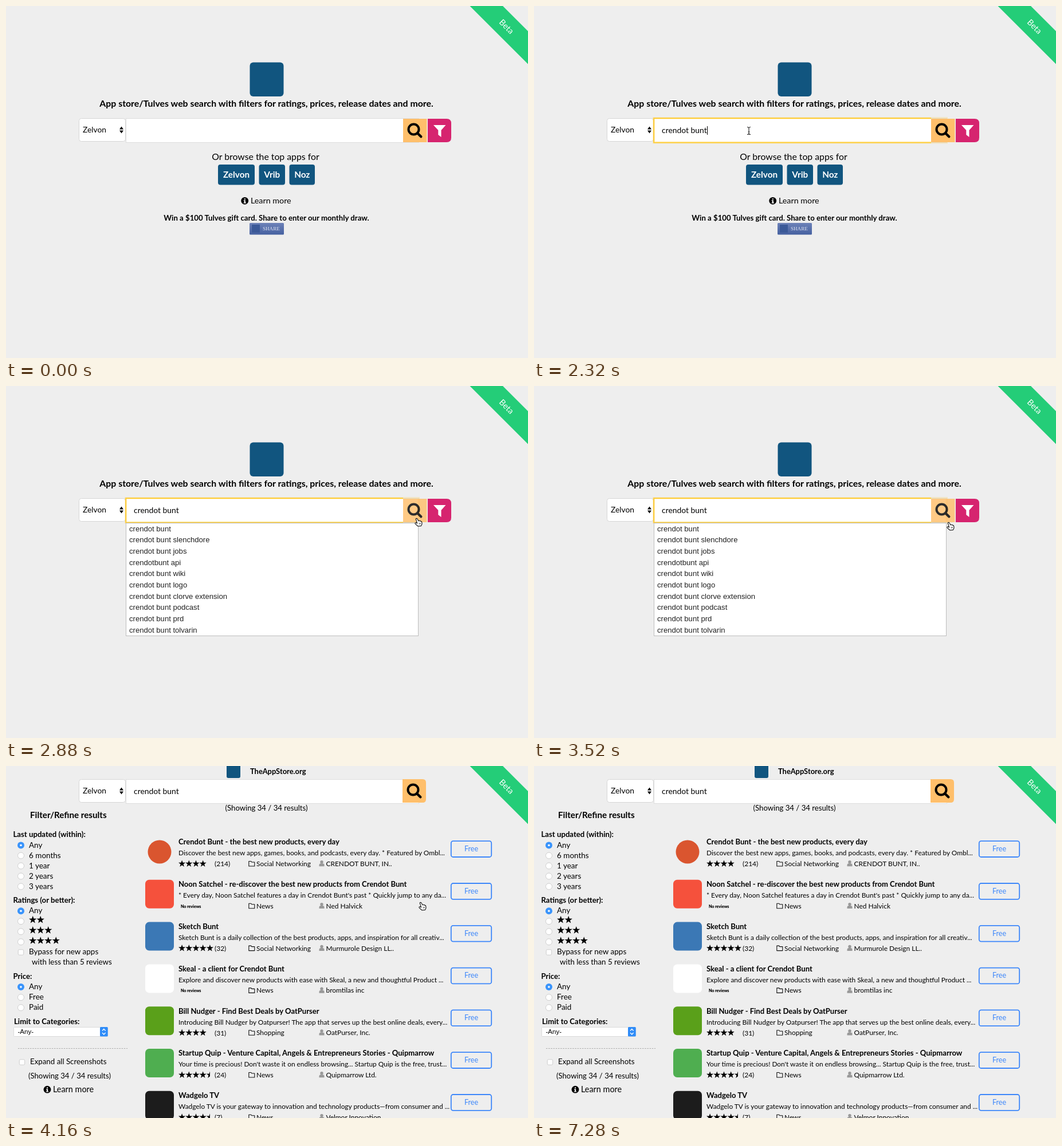
An HTML page that plays this animation: 911 px wide and 615 px high, repeating every 7360 ms.

```html
<!DOCTYPE html>
<html lang="en">
<head>
<meta charset="utf-8">
<title>App search</title>
<style>
  html, body { margin: 0; width: 100%; height: 100%; overflow: hidden; background: #eee; }
  svg { display: block; width: 911px; height: 615px; }
  text { font-family: Lato, "Open Sans", sans-serif; white-space: pre; }
  .arial { font-family: "Liberation Sans", Arial, sans-serif; }
  .serif { font-family: "Liberation Serif", serif; }
</style>
</head>
<body>
<svg id="stage" viewBox="0 0 911 615" xmlns="http://www.w3.org/2000/svg"></svg>
<script>
const LOOP = 7360, STEP = 80;
const BLUE = '#11557f', ORANGE = '#ffbf6b', LINK = '#3d87fa';
const QUERY = 'crendot bunt', DEVICE = 'Zelvon';

const text = (x, y, size, str, attrs = '') =>
  `<text x="${x}" y="${y}" font-size="${size}" ${attrs}>${str}</text>`;
const bold = (x, y, size, str, attrs = '') => text(x, y, size, str, 'font-weight="700" ' + attrs);
const rect = (x, y, w, h, fill, attrs = '') =>
  `<rect x="${x}" y="${y}" width="${w}" height="${h}" fill="${fill}" ${attrs}/>`;
const circle = (x, y, r, fill, attrs = '') => `<circle cx="${x}" cy="${y}" r="${r}" fill="${fill}" ${attrs}/>`;
const path = (d, fill, attrs = '') => `<path d="${d}" fill="${fill}" ${attrs}/>`;
const group = (id, ...parts) => `<g id="${id}">${parts.join('')}</g>`;
const MID = 'text-anchor="middle"';

// Points of a star; a half star keeps only the points left of its axis.
function star(x, y, r, half) {
  const points = [];
  for (let i = 0; i <= (half ? 5 : 9); i++) {
    const a = -Math.PI / 2 - i * Math.PI / 5, d = i % 2 ? r * 0.4 : r;
    points.push(`${(x + d * Math.cos(a)).toFixed(2)},${(y + d * Math.sin(a)).toFixed(2)}`);
  }
  return `<polygon points="${points.join(' ')}"/>`;
}
function stars(x, y, count, r, pitch) {
  let out = '';
  for (let i = 0; i < count; i++) out += star(x + pitch * (i + 0.5), y, r, count - i < 1);
  return out;
}

const magnifier = (x, y) =>
  circle(x - 2, y - 2, 9, 'none', 'stroke="#000" stroke-width="4"') +
  path(`M${x + 4.7} ${y + 4.7}L${x + 10.8} ${y + 10.8}`, 'none', 'stroke="#000" stroke-width="4.4" stroke-linecap="round"');
const info = (x, y) => circle(x, y, 6.4, '#000') +
  path(`M${x - 1} ${y - 4}h2.2v2h-2.2zM${x - 2} ${y - 1}h3.2v4h1v1.4h-4.2v-1.4h1v-2.6h-1z`, '#eee');
const radio = (y, on) => on
  ? circle(26, y, 6, '#3a94fb') + circle(26, y, 1.8, '#fff')
  : circle(26, y, 5.5, '#fff', 'stroke="#c4c4c4" stroke-width=".8"');
const checkbox = (x, y) => rect(x - 4.7, y - 4.7, 9.4, 9.4, '#fff', 'rx="2" stroke="#c4c4c4" stroke-width=".8"');
const deviceSelect = y =>
  rect(127.5, y + 0.5, 81, 40, '#fff', 'rx="4" stroke="#d6d6d6"') +
  text(134, y + 25.3, 13.8, DEVICE) +
  path(`M198 ${y + 19.5}l3.5 -5l3.5 5zM198 ${y + 21.5}l3.5 5l3.5 -5z`, '#000');
const inputBox = y => rect(209.5, y + 0.5, 511, 42, '#fff', 'stroke="#ddd"');
const ribbon = path('M809.5 0H867L911 44V101.5Z', '#24cd78') +
  text(0, 5, 14.3, 'Beta', `${MID} fill="#fff" transform="translate(873.5 36) rotate(45)"`);

const pill = (x, w, label) => rect(x, 277, w, 35.5, BLUE, 'rx="4"') +
  bold(x + w / 2, 300.3, 15.3, label, `${MID} fill="#fff"`);

const suggestions = [QUERY, QUERY + ' slenchdore', QUERY + ' jobs', 'crendotbunt api', QUERY + ' wiki',
  QUERY + ' logo', QUERY + ' clorve extension', QUERY + ' podcast', QUERY + ' prd', QUERY + ' tolvarin'];

const home = group('home',
  ribbon,
  rect(425.5, 98.5, 59, 59.5, BLUE, 'rx="6"'),
  bold(454.5, 176.3, 15.85, 'App store/Tulves web search with filters for ratings, prices, release dates and more.', MID),
  text(453, 269.2, 15.8, 'Or browse the top apps for', MID),
  pill(370, 64, DEVICE), pill(441.5, 45.5, 'Vrib'), pill(494.5, 44.5, 'Noz'),
  info(416.7, 340.3), text(427, 345.2, 14.3, 'Learn more'),
  bold(454.5, 375, 13.2, 'Win a $100 Tulves gift card. Share to enter our monthly draw.', MID),
  rect(425, 379, 60, 20.5, 'url(#share)', 'rx="1.5"'),
  rect(429, 382, 14, 14, '#3b5998'),
  text(448, 392.3, 9.1, 'SHARE', 'class="serif" fill="#e4e8f4"'),
  deviceSelect(196), inputBox(196),
  group('focus',
    rect(209, 196, 511, 42.5, 'none', 'stroke="#ffc52e" stroke-opacity=".22" stroke-width="4"'),
    path('M693 196.2H209.2V238.6H693', 'none', 'stroke="#ffcb2b" stroke-width="1.8"')),
  group('dropdown',
    rect(209.5, 239.5, 510, 197, '#fff', 'stroke="#bdbdbd"'),
    ...suggestions.map((s, i) => text(215, 253.6 + i * 19.67, 13.1, s, 'class="arial" fill="#222"'))),
  group('go', rect(693, 197, 41.5, 41, ORANGE), magnifier(713.5, 217.5)),
  path('M736 197H769q8 0 8 8V230q0 8 -8 8H736Z', '#d6246f'),
  path('M746 208H767.5L759.5 217V229L754.3 225V217Z', '#fff'),
  text(223, 222, 13.9, '', 'id="typed"'),
  rect(302, 210, 1, 15, '#000', 'id="caret"'));

const controls = group('controls',
  rect(0, -6, 24, 27, BLUE, 'rx="3" id="mark"'),
  deviceSelect(23), inputBox(23),
  path('M692 23H727q6 0 6 6V58q0 6 -6 6H692Z', ORANGE),
  ...[138.5, 156.5, 174.5, 192.5, 210.5].map((y, i) => radio(y, !i)),
  ...[253.3, 271.3, 289.3, 307.3].map((y, i) => radio(y, !i)),
  checkbox(26, 325.5),
  ...[386, 404.2, 422.2].map((y, i) => radio(y, !i)),
  stars(40, 268.8, 2, 7, 13.5), stars(40, 287, 3, 7, 13.5),
  rect(13.5, 456.5, 164, 16, '#fff', 'rx="1" stroke="#d4d4d4" stroke-width=".8"'),
  rect(164, 456, 13.7, 16.5, '#2f8cf8', 'rx="1.5"'),
  path('M168 462.5l2.8 -3l2.8 3M168 466l2.8 3l2.8 -3', 'none', 'stroke="#fff" stroke-width="1.3"'),
  text(20.5, 468.3, 11.6, '-Any-', 'class="arial"'),
  path('M21 493.5H212', 'none', 'stroke="#aaa" stroke-dasharray="2.5 1.7"'),
  checkbox(28, 517.5));

const frame = (y, h) => rect(776.8, y, 70.4, h, 'none', `rx="3.5" stroke="${LINK}" stroke-width="1.8"`);
const loading = group('loading', ...Array.from({ length: 7 }, (_, i) => frame(131.2 + i * 71.4, 27)));

const apps = [
  ['#da552f', 'Crendot Bunt - the best new products, every day',
    'Discover the best new apps, games, books, and podcasts, every day. * Featured by Ombl...',
    4, 214, 'Social Networking', 'CRENDOT BUNT, IN..'],
  ['#f5513c', 'Noon Satchel - re-discover the best new products from Crendot Bunt',
    "* Every day, Noon Satchel features a day in Crendot Bunt's past * Quickly jump to any da...",
    0, 0, 'News', 'Ned Halvick'],
  ['#3b78b5', 'Sketch Bunt',
    'Sketch Bunt is a daily collection of the best products, apps, and inspiration for all creativ...',
    5, 32, 'Social Networking', 'Murmurole Design LL..'],
  ['#fff', 'Skeal - a client for Crendot Bunt',
    'Explore and discover new products with ease with Skeal, a new and thoughtful Product ...',
    0, 0, 'News', 'bromtilas inc'],
  ['#5aa01a', 'Bill Nudger - Find Best Deals by OatPurser',
    'Introducing Bill Nudger by Oatpurser! The app that serves up the best online deals, every...',
    4, 31, 'Shopping', 'OatPurser, Inc.'],
  ['#4fae50', 'Startup Quip - Venture Capital, Angels &amp; Entrepreneurs Stories - Quipmarrow',
    "Your time is precious! Don't waste it on endless browsing... Startup Quip is the free, trust...",
    4.5, 24, 'News', 'Quipmarrow Ltd.'],
  ['#1c1c1c', 'Wadgelo TV',
    'Wadgelo TV is your gateway to innovation and technology products—from consumer and ...',
    4.5, 7, 'News', 'Velmor Innovation']
];

function appRow([color, title, blurb, rating, reviews, category, maker], i) {
  const y = 125 + i * 73.8;
  return (i ? rect(243, y, 50, 50, color, 'rx="7"') : circle(268, y + 25, 20.5, color)) +
    bold(301, y + 12.4, 13.05, title) +
    text(301, y + 31.4, 11.9, blurb) +
    (rating ? stars(301, y + 45.8, rating, 6.4, 12.2) + text(364, y + 50.3, 12, `(${reviews})`)
            : text(305, y + 48.8, 7, 'No reviews', 'font-weight="900"')) +
    path(`M423.8 ${y + 50}v-8.5h4l1 1.5h5v7z`, 'none', 'stroke="#111" stroke-width="1.1" stroke-linejoin="round"') +
    text(437, y + 50, 11.9, category) +
    circle(551, y + 42.8, 2.7, '#999') +
    path(`M546.5 ${y + 50.3}v-2q0 -3 3 -3h3q3 0 3 3v2z`, '#999') +
    text(558.5, y + 50, 11.95, maker) +
    frame(y + 6.2, 27.8) + text(812, y + 24, 12.6, 'Free', `${MID} fill="${LINK}"`);
}

const label = (y, str) => text(40, y, 13.5, str);
const heading = (x, y, str) => bold(x, y, 13.2, str);
const results = group('results',
  ribbon,
  bold(426, 13.6, 12.9, 'TheAppStore.org'),
  text(223, 49, 13.9, QUERY), magnifier(712.5, 43.5),
  text(454.5, 78.2, 13.15, '(Showing 34 / 34 results)', MID),
  bold(42, 91, 15.2, 'Filter/Refine results'),
  heading(12.5, 123.8, 'Last updated (within):'),
  ...['Any', '6 months', '1 year', '2 years', '3 years'].map((s, i) => label(142.5 + i * 18, s)),
  heading(12.5, 239, 'Ratings (or better):'), label(257.3, 'Any'),
  stars(40, 305.2, 4, 7, 13.5),
  label(329.3, 'Bypass for new apps'), text(45, 347.2, 13.3, 'with less than 5 reviews'),
  heading(12.5, 371.8, 'Price:'),
  ...['Any', 'Free', 'Paid'].map((s, i) => label(390 + i * 18, s)),
  heading(14, 450.6, 'Limit to Categories:'),
  text(42, 521.4, 13.3, 'Expand all Screenshots'),
  text(39, 545.7, 13.15, '(Showing 34 / 34 results)'),
  info(72, 565.2), text(82, 570.3, 14.4, 'Learn more'),
  ...apps.map(appRow));

const pointers = group('pointer',
  group('arrow', path('M0 0V14L3.2 11L5.5 16L7.8 15L5.5 10.2H10Z', '#000', 'stroke="#fff"')),
  group('beam', path('M-3 -6.5Q0 -6.5 0 -4.5Q0 -6.5 3 -6.5M0 -5V5M-3 6.5Q0 6.5 0 4.5Q0 6.5 3 6.5M-1.5 2H1.5',
    'none', 'stroke="#222" stroke-width="1.1"')),
  group('hand', path('M-4.8 -5.8Q-3.2 -7.6 -1.8 -5.5L-.2 -2.3Q1 -3.2 2 -2.2Q3.2 -2.8 4 -1.6Q5.6 -1.6 5.8 .4L6 3L4.6 6.4L-1 7L-5.8 2.8Q-6.6 .8 -4.6 .8L-2.4 2Z',
    '#fff', 'stroke="#111" stroke-width="1.1" stroke-linejoin="round"') +
    path('M1 1.2l.6 2.6M3 .8l.5 2.6', 'none', 'stroke="#111" stroke-width=".8"')));

const stage = document.getElementById('stage');
stage.innerHTML = `<defs><linearGradient id="share" x2="0" y2="1"><stop stop-color="#6d82b8"/>
  <stop offset="1" stop-color="#4560a0"/></linearGradient></defs>` +
  rect(0, 0, 911, 615, '#eee') + home + controls + loading + results + pointers;

const el = {};
stage.querySelectorAll('[id]').forEach(node => el[node.id] = node);

// Each step: start time, then the state held until the next one.
const pointerSteps = [
  [0], [720, 470, 481, 'arrow'], [800, 452, 437, 'arrow'], [880, 425, 372, 'arrow'],
  [960, 396, 306, 'arrow'], [1040, 372, 252, 'arrow'], [1120, 362, 228, 'beam'], [1200, 375, 218, 'beam'],
  [2400, 436, 221, 'beam'], [2480, 545, 225, 'beam'], [2560, 626, 227, 'beam'], [2640, 676, 229, 'beam'],
  [2720, 702, 232, 'hand'], [2800, 714, 235, 'hand'], [2880, 720, 238, 'hand'], [2960, 723, 241, 'hand'],
  [3040, 725, 243, 'hand'], [3120, 726, 244, 'hand'], [3200, 727, 245, 'hand'],
  [4880, 716, 320, 'arrow'], [4960, 690, 480, 'arrow'], [5040]
];
const typingSteps = [[0, 0], [1840, 1], [1920, 3], [2000, 5], [2080, 7], [2160, 8], [2240, 10], [2320, 12]];
const caretSteps = [[0, false], [1760, true], [2560, false], [3040, true], [3520, false]];

const at = (steps, t) => steps.findLast(step => step[0] <= t);
const show = (node, on) => { node.style.display = on ? '' : 'none'; };

function render(t) {
  show(el.home, t < 4000);
  show(el.controls, t >= 4000);
  show(el.loading, t >= 4000 && t < 4160);
  show(el.results, t >= 4160);
  el.mark.setAttribute('x', t < 4160 ? 381 : 385);

  show(el.focus, t >= 1760);
  show(el.dropdown, t >= 2400);
  el.go.setAttribute('opacity', t >= 2720 ? 0.82 : 1);

  const typed = QUERY.slice(0, at(typingSteps, t)[1]);
  if (el.typed.textContent !== typed) el.typed.textContent = typed;
  show(el.caret, at(caretSteps, t)[1]);
  if (t < 4000) el.caret.setAttribute('x', Math.round(223 + (typed ? el.typed.getComputedTextLength() : 0)));

  const [, x, y, kind] = at(pointerSteps, t);
  show(el.pointer, kind);
  if (kind) el.pointer.setAttribute('transform', `translate(${x} ${y})`);
  for (const name of ['arrow', 'beam', 'hand']) show(el[name], name === kind);
}

const start = performance.now();
function tick() {
  const t = (performance.now() - start) % LOOP;
  render(Math.floor(t / STEP) * STEP);
  requestAnimationFrame(tick);
}
tick();
</script>
</body>
</html>
```
